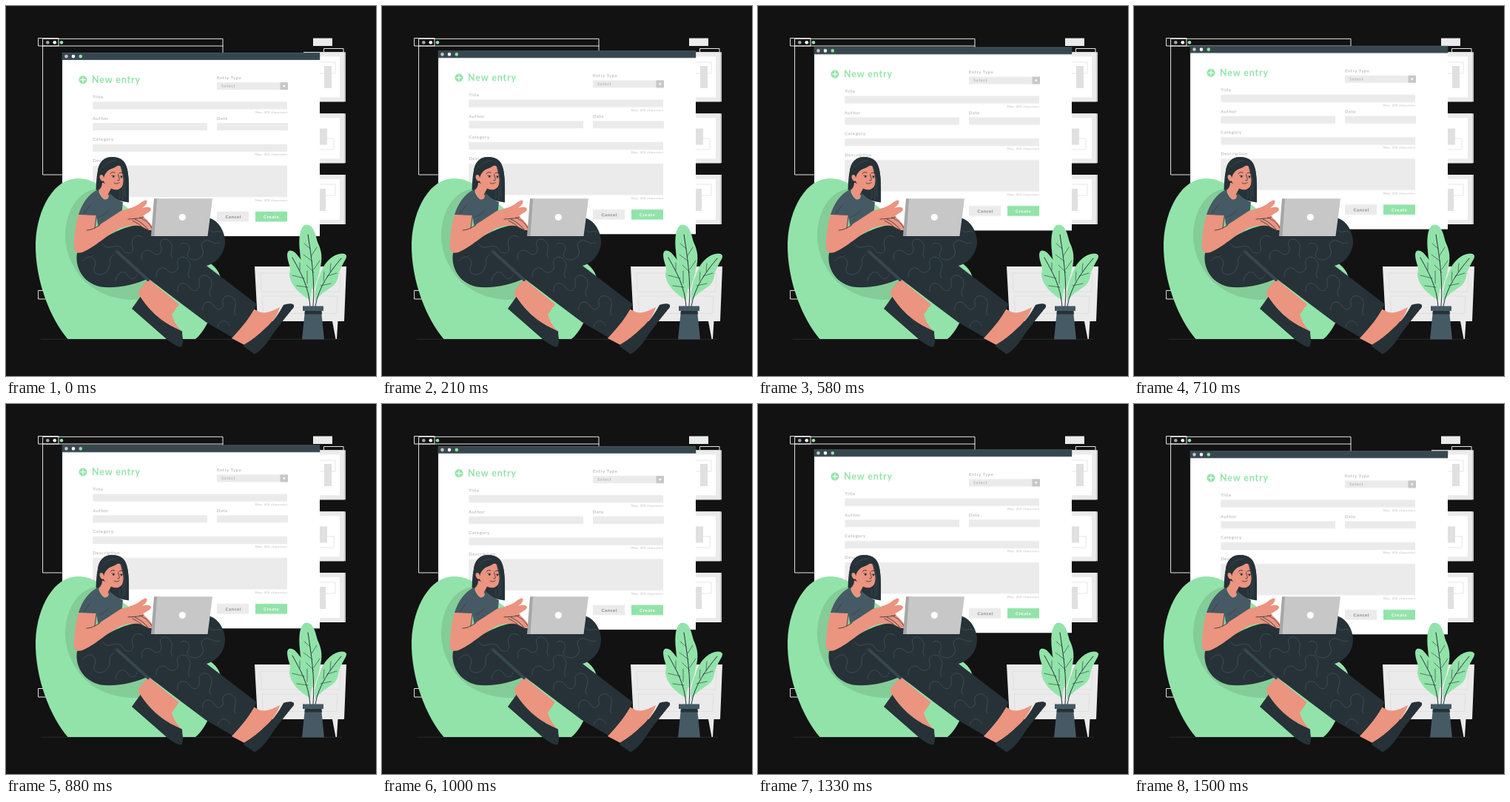
An HTML page for the animation above (1.54 s loop, 500 by 500 pixels).

```html
<!DOCTYPE html>
<html lang="en">
<head>
<meta charset="utf-8">
<title>New entry</title>
<style>
html, body { margin: 0; width: 100%; height: 100%; overflow: hidden; background: #121212; }
svg { display: block; width: 100%; height: 100%; }
text { font-family: Lato, "Open Sans", sans-serif; }
.float { animation: float 1540ms linear infinite; }
@keyframes float {
  0% { transform: translateY(-.3px); }
  47.7% { transform: translateY(-10px); }
  96.8% { transform: translateY(0); }
  100% { transform: translateY(-.3px); }
}
.title { font-size: 12.5px; font-weight: 700; letter-spacing: .85px; fill: #92e3a9; }
.label { font-size: 6px; letter-spacing: .55px; fill: #a8a8a8; }
.hint { font-size: 4px; letter-spacing: .4px; fill: #b0b0b0; }
.button { font-size: 6.2px; font-weight: 700; letter-spacing: .5px; }
.line { fill: none; stroke-linecap: round; stroke-linejoin: round; }
.green { fill: #92e3a9; }
.dark { fill: #263238; }
.slate { fill: #455a64; }
.skin { fill: #eb947f; }
.pale { fill: #ebebeb; }
</style>
</head>
<body>
<svg viewBox="0 0 500 500">
  <rect width="500" height="500" fill="#121212"/>
  <path class="line" d="M47 450.3H453" stroke="#263238" stroke-width=".8"/>

  <!-- outlined window -->
  <g class="line" stroke="#e6e6e6" stroke-width="1">
    <path d="M50 44.3H293V228H50ZM50 54H293"/>
    <path d="M44 43.5H71V54H44ZM44 384.5H62V396H44Z"/>
    <path d="M429.500 62V57.500H456V62"/>
  </g>
  <circle cx="56.300" cy="49.200" r="2.300" fill="#a6a6a6"/>
  <circle cx="65.800" cy="49.200" r="2.300" fill="#fff"/>
  <circle cx="75" cy="49.200" r="2.300" class="green"/>
  <rect x="415" y="43.500" width="26" height="10.500" class="pale"/>

  <!-- wall pictures -->
  <defs>
    <g id="picture">
      <rect x="402" width="57" height="67" fill="#c9c9c9"/>
      <rect x="402" width="55" height="67" fill="#ebebeb"/>
      <rect x="408" y="6" width="43" height="55" fill="#fff"/>
    </g>
  </defs>
  <use href="#picture" y="62.300"/>
  <use href="#picture" y="145.300"/>
  <use href="#picture" y="228"/>
  <g fill="#e0e0e0">
    <rect x="430" y="81" width="10" height="30"/>
    <rect x="416" y="165.500" width="18" height="22"/>
    <rect x="416" y="247" width="16" height="30"/>
  </g>
  <path class="line" d="M414 76H445V91H414ZM414 179H443V194H414ZM414 241H445V256H414Z" stroke="#e0e0e0" stroke-width=".8"/>

  <!-- form window -->
  <g class="float">
    <rect x="76" y="63.400" width="348" height="248" fill="#fff"/>
    <rect x="75.600" y="63.400" width="348.600" height="9.800" fill="#37474f"/>
    <path class="line" d="M75.800 73V311.300" stroke="#37474f" stroke-width=".5"/>
    <circle cx="81.500" cy="68.400" r="2.300" fill="#c7c7c7"/>
    <circle cx="91" cy="68.400" r="2.300" fill="#fff"/>
    <circle cx="100.800" cy="68.400" r="2.300" class="green"/>

    <circle cx="104" cy="100" r="5.500" class="green"/>
    <path class="line" d="M100.800 100H107.200M104 96.800V103.200" stroke="#fff" stroke-width="1.200"/>
    <text class="title" x="116" y="104.500">New entry</text>

    <g class="pale">
      <rect x="285" y="103.500" width="96" height="10"/>
      <rect x="117.300" y="129.600" width="262.700" height="10.200"/>
      <rect x="117.300" y="158.400" width="154.700" height="10"/>
      <rect x="285" y="158.400" width="96" height="10"/>
      <rect x="117.300" y="187" width="262.700" height="10.200"/>
      <rect x="117.300" y="216" width="262.700" height="42.500"/>
      <rect x="285" y="278" width="43" height="13.700"/>
    </g>
    <rect x="370.500" y="103.500" width="10.500" height="10" fill="#c7c7c7"/>
    <path d="M373.800 107.300H377.700L375.750 110.600Z" fill="#fff"/>
    <rect x="337" y="278" width="43" height="13.700" class="green"/>

    <g class="label">
      <text x="285" y="99.200">Entry Type</text>
      <text x="291" y="110.600">Select</text>
      <text x="117.300" y="125.200">Title</text>
      <text x="117.300" y="154.200">Author</text>
      <text x="285" y="154.200">Date</text>
      <text x="117.300" y="182.800">Category</text>
      <text x="117.300" y="211.500">Description</text>
    </g>
    <g class="hint" text-anchor="end">
      <text x="380.400" y="145.400">Max. 250 characters</text>
      <text x="380.400" y="202.800">Max. 250 characters</text>
      <text x="380.400" y="264">Max. 250 characters</text>
    </g>
    <g class="button" text-anchor="middle">
      <text x="307.200" y="287" fill="#858585">Cancel</text>
      <text x="358.700" y="287" fill="#fff">Create</text>
    </g>
  </g>

  <!-- cabinet -->
  <path class="pale" d="M336 352H460L457 426H340ZM441 426H448.500L447 450H445.500Z"/>
  <path class="line" d="M344.500 361H452L450.500 386H346ZM346.500 392H448L446.500 415.500H348Z" stroke="#dcdcdc" stroke-width=".8"/>

  <!-- plant -->
  <g class="green">
    <path d="M415 384C407 372 398 352 397 330C395 311 398 296 406 295.500C415 295.500 418 307 421 319C427 331 428 342 424 356C422 368 418 378 415 384Z"/>
    <path d="M411 398C398 389 387 380 384 368C381 360 386 358 383 350C380 341 378 331 384 330.500C391 330 395 340 402 346C412 354 413 364 414 377Z"/>
    <path d="M418 399C416 382 421 372 425 362C428 350 438 338 450 335C458 333 462 336 459 342C455 349 453 353 450 360C448 370 447 376 438 381C431 386 424 390 418 399Z"/>
  </g>
  <g class="line" stroke="#263238" stroke-width="1">
    <path d="M408 309C412 335 418 370 415 406M387 340C398 360 409 378 411 406M453 341C438 359 422 380 418 406"/>
    <path stroke-width=".6" d="M411 328L403 321M414 345L402 336M416 360L406 350M413 337L420 326M416 356L424 344M397 357V347M403 368L387 364M408 380L393 378M407 375V358M438 359L439 348M429 371L430 359M434 365L447 361M425 378L439 375"/>
  </g>
  <path class="slate" d="M404 412H426L430 450.500H400Z"/>
  <path class="dark" d="M404 411H426.500L427 416.500H403.500Z"/>
  <rect x="401" y="405.500" width="28" height="6.500" class="slate"/>

  <!-- bean bag -->
  <path class="green" d="M83.500 450C61 424 39 372 40 320C42 272 66 233 97 233C115 233 128 241 150 262L240 330C275 342 290 356 290 370C284 404 272 438 256 450Z"/>
  <path d="M123 247C96 250 79 280 80 315C83 350 106 385 150 394.500C170 398.500 185 397.500 193 394L205 370L150 330L150 262C141 254 132 248 123 247Z" fill="#84cc98"/>

  <!-- far foot -->
  <path class="skin" d="M179 385L192 369L234 403L224 417C227 428 233 435 239 441L232 446L181 397Z"/>
  <path class="dark" d="M181.500 393C190 406 202 419 216 428C225 434 233 437 238 439.500C238 447 241 455 237 460.500C231 461 225 456 218 451L170 409Z"/>

  <!-- near foot -->
  <path class="skin" d="M305 449L326 405L340 412C349 418 360 412 370 407C367 418 358 430 346 440L324 459Z"/>
  <path class="dark" d="M389 404C386 401 380 402.500 375 404C369 415 362 426 351 435C342 444 333 451 322 457.500L321.500 460.500L336 470.500C347 465 355 452 363 440C371 429 380 418 389 407Z"/>

  <!-- hair behind, neck -->
  <path class="dark" d="M143 204C132 204 125 213 124 223C122 232 122 242 121.500 248C130 254 146 263 166 265.500C166 248 167 232 163 218C160 208 153 204 143 204Z"/>
  <path class="skin" d="M130 238L143 245L138 254C141 260 136 263 131 261L125 249C129 246 130 242 130 238Z"/>

  <!-- torso -->
  <path class="slate" d="M124 248C112 254 103 266 98 282L122 284L126 304L155 293L158 265C151 262 145 258 139 252C140 259 137 263 132 261C128 258 126 253 124 248Z"/>

  <!-- trousers -->
  <path class="dark" d="M96 334C93 352 103 374 128 379.500C150 382 175 377 192 368L238 403L270 427L306 448C318 435 330 421 339 403L271 351C288 346 297 331 296 316C294 299 283 287 272 286L197 300L180 296C155 297 125 318 96 334Z"/>
  <path class="line" d="M150 332L192 370" stroke="#37474f" stroke-width="4"/>
  <g class="line" stroke="#455a64" stroke-width=".7">
    <path d="M104 345C112 332 124 342 120 352C115 362 128 367 136 359C144 350 136 340 145 337"/>
    <path d="M131 322C137 333 150 318 157 328C163 338 174 335 171 324C168 314 177 306 185 313"/>
    <path d="M148 372C149 360 160 355 165 365C169 371 176 369 177 363"/>
    <path d="M184 343C180 333 190 326 198 333C205 340 213 333 209 324C206 316 216 311 222 319C228 327 219 335 225 341"/>
    <path d="M203 366C202 356 211 350 218 357C225 364 235 358 232 349C229 340 241 335 247 344C253 353 243 360 248 368"/>
    <path d="M232 386C230 374 242 371 248 380C253 389 263 384 261 374C259 363 272 360 277 370C281 379 271 386 277 393"/>
    <path d="M266 411C264 400 275 396 281 405C286 414 295 410 293 401C291 391 304 388 309 397C313 404 306 412 310 418"/>
    <path d="M236 322C244 316 251 327 246 333C241 342 257 347 264 339C271 330 260 325 266 319C273 312 281 324 289 320"/>
    <path d="M286 434C288 423 299 423 302 432M275 302C279 310 286 301 291 306"/>
  </g>

  <!-- arms and hands -->
  <path class="skin" d="M98 282L122 283C122 290 121 295 120 300C132 292 144 284 155 277C166 274 176 271 182 266C187 262 191 261 190.500 265C190 268 187 271 184 273C190 271 196 271 196 275C195 279 189 280 185 284C191 289 198 296 200 303L193 303L183 298C166 293 150 301 137 311C126 319 116 327 105 332C98 335 92 334 92 326C92 311 94 296 98 282Z"/>
  <g class="line" stroke="#263238" stroke-width=".8">
    <path d="M122 284L120 300C116 302 112 303 109 303M120 300L127 296"/>
    <path d="M165 288C174 287 179 288 186 285M174 288C181 291 187 296 192 302M181 286C189 289 195 295 198 302M171 290C177 293 182 296 186 301"/>
    <path stroke-width=".5" d="M126 285C131 283 136 280 139 276M105 281L114 269"/>
  </g>

  <!-- head -->
  <path class="skin" d="M132 220C139 218 148 215 154 216C160 220 161 231 158 241C156 248 149 250 143 247C135 244 131 237 130 230Z"/>
  <path class="dark" d="M143 204C129 204 123 216 124 230C126 236 129 239 132 239C131 231 134 225 140 221C146 219 151 216 154 213C156 224 160 231 158 243L156 260C160 264 164 265 166 263C165 245 168 223 160 211C156 206 150 204 143 204Z"/>
  <path class="skin" d="M131 229C127 226 125 231 128 235C130 238 133 237 133 234Z"/>
  <g class="line" stroke="#263238" stroke-width=".9">
    <path d="M141 226.500C143 224.300 145 224.300 147 225.300M153 226C155 224.500 156.500 225 158 226.300"/>
    <path stroke-width=".8" d="M151.500 227.500C151.700 231 154 234 153 235.500C152.300 236.300 151 236 150.500 235.600M146 239C148.500 240.700 151 240.300 153 238.800"/>
    <path stroke-width=".6" d="M142.500 229L147 229.500M154 230L158 230"/>
  </g>
  <ellipse cx="145.200" cy="230.300" rx="1.200" ry="1.600" class="dark"/>
  <ellipse cx="156" cy="231" rx="1.100" ry="1.600" class="dark"/>
  <path class="line" d="M131 218C135 212 142 209 149 209M156 217C161 230 160 246 161 258M158 244V262M154 250V259" stroke="#455a64" stroke-width=".5"/>

  <!-- laptop -->
  <path d="M200 260.300H207L203 311H196Z" fill="#a6a6a6"/>
  <path d="M204 260.300H279L272.500 311H200.500Z" fill="#c7c7c7"/>
  <circle cx="238.300" cy="285.500" r="4.600" fill="#fff"/>
</svg>
</body>
</html>
```
